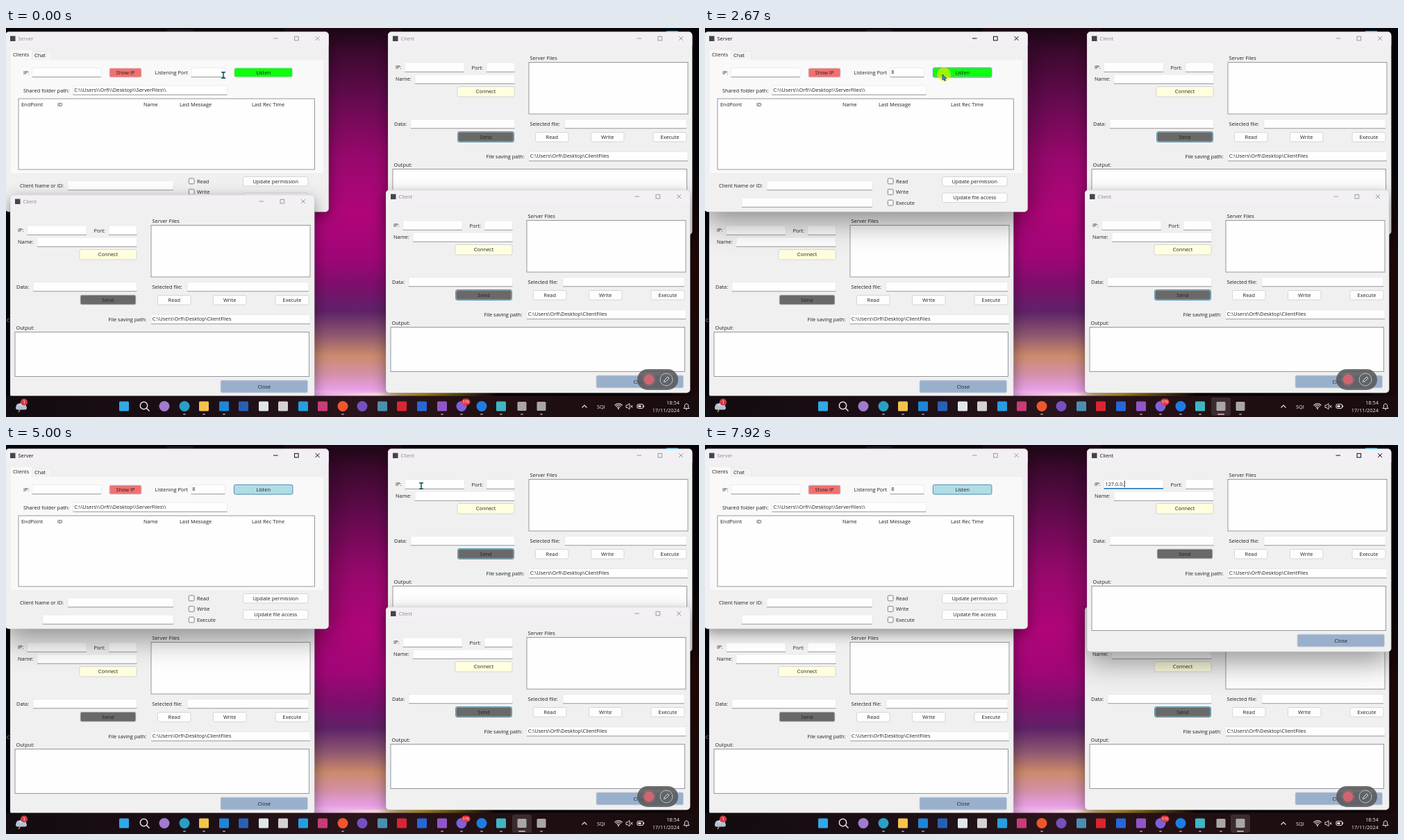
Recreate the animation shown at these times as an HTML page with a canvas. Size 998 px wide and 561 px high, loop 8 s.

```html
<!DOCTYPE html>
<html lang="en">
<head>
<meta charset="utf-8">
<title>Server and clients</title>
<style>
html, body { margin: 0; width: 100%; height: 100%; overflow: hidden; background: #000; }
canvas { display: block; width: 998px; height: 561px; }
</style>
</head>
<body>
<canvas id="stage" width="998" height="561"></canvas>
<script>
const ctx = document.getElementById('stage').getContext('2d');
const LOOP = 8000;
const FONT = '"Open Sans", "Noto Sans", sans-serif';
const INK = '#202020';
const BLUE = '#1a6fc0';

// moments of the story, in ms
const SERVER_CLICK = 340, HIDE_BEAM = 1250, TYPE_PORT = 1500;
const LISTEN_CLICK = 2600, LISTENING = 2840;
const CLIENT_CLICK = 5170;
const ADDRESS = '127.0.0.';
const KEYS = [5750, 5920, 6250, 6750, 7000, 7250, 7420, 7500];
const PATH = [
  [2090, 313, 68], [2560, 342, 67], [3750, 342, 67],
  [4090, 470, 80], [4250, 470, 80], [4950, 598, 59]
];

function rect(x, y, w, h, fill) {
  ctx.fillStyle = fill;
  ctx.fillRect(x, y, w, h);
}

function round(x, y, w, h, r, fill, stroke, line = 1) {
  ctx.beginPath();
  ctx.roundRect(x, y, w, h, r);
  if (fill) { ctx.fillStyle = fill; ctx.fill(); }
  if (stroke) { ctx.strokeStyle = stroke; ctx.lineWidth = line; ctx.stroke(); }
}

function disc(x, y, r, fill, stroke, line = 1) {
  ctx.beginPath();
  ctx.arc(x, y, r, 0, Math.PI * 2);
  if (fill) { ctx.fillStyle = fill; ctx.fill(); }
  if (stroke) { ctx.strokeStyle = stroke; ctx.lineWidth = line; ctx.stroke(); }
}

function lines(color, width, ...runs) {
  ctx.strokeStyle = color;
  ctx.lineWidth = width;
  ctx.beginPath();
  for (const p of runs) {
    ctx.moveTo(p[0], p[1]);
    for (let i = 2; i < p.length; i += 2) ctx.lineTo(p[i], p[i + 1]);
  }
  ctx.stroke();
}

// y is the middle of the capitals
function text(s, x, y, color = INK, align = 'left', size = 7.4) {
  ctx.font = size + 'px ' + FONT;
  ctx.textAlign = align;
  ctx.fillStyle = color;
  ctx.fillText(s, x, y + size * 0.355);
}

function gradient(x0, y0, x1, y1, ...stops) {
  const g = ctx.createLinearGradient(x0, y0, x1, y1);
  for (const [at, color] of stops) g.addColorStop(at, color);
  return g;
}

function field(x, y, w, value = '', focus = false, caret = false) {
  round(x, y, w, 13.5, 1.5, '#fefefe', '#e6e6e8', 0.7);
  if (focus) rect(x, y + 12, w, 1.5, BLUE);
  else rect(x, y + 12.8, w, 0.9, '#929296');
  if (value) text(value, x + 1.8, y + 6.2);
  if (caret) {
    ctx.font = '7.4px ' + FONT;
    rect(x + 2.2 + ctx.measureText(value).width, y + 1.5, 0.9, 9.5, '#111');
  }
}

function button(label, x, y, w, h = 14, fill = '#fdfdfd', focus = false) {
  round(x, y, w, h, 2, fill, '#d2d2d4', 0.9);
  if (focus) round(x - 0.4, y - 0.4, w + 0.8, h + 0.8, 2, null, '#4691b0', 1);
  text(label, x + w / 2, y + h / 2, INK, 'center');
}

function box(x, y, w, h) {
  rect(x, y, w, h, '#fefefe');
  ctx.strokeStyle = '#8b8e96';
  ctx.lineWidth = 0.9;
  ctx.strokeRect(x, y, w, h);
}

function frame(title, w, h, active) {
  ctx.save();
  ctx.shadowColor = 'rgba(0,0,0,.42)';
  ctx.shadowBlur = active ? 42 : 20;
  ctx.shadowOffsetY = active ? 14 : 6;
  round(-1, -0.5, w + 1.3, h + 0.8, 5, '#f0f0f0');
  ctx.restore();
  round(-1, -0.5, w + 1.3, 19.5, [5, 5, 0, 0], '#f3f0f5');
  round(-0.8, -0.3, w + 1, h + 0.5, 5, null, 'rgba(150,150,155,.4)', 0.6);
  rect(6, 5.5, 7.5, 7.5, '#454548');
  text(title, 17.5, 9.3, active ? '#111' : '#8a8a8e');
  const c = active ? '#111' : '#99999d', r = w - 16;
  lines(c, 1, [r - 63.5, 9, r - 57, 9], [r - 3, 6, r + 3, 12], [r + 3, 6, r - 3, 12]);
  ctx.strokeRect(r - 33, 6.3, 5.6, 5.6);
}

function client(x, y, { active = false, sendFocus = false, ip = '', caret = false }) {
  ctx.save();
  ctx.translate(x, y);
  frame('Client', 437, 292, active);
  text('IP:', 10, 50.3);
  field(23.5, 44, 85.5, ip, active, caret);
  text('Port:', 119.5, 51);
  field(141, 44, 40.5);
  text('Name:', 10, 67.5);
  field(38, 61, 143.5);
  button('Connect', 99, 78.5, 82, 14.5, '#ffffe0');
  text('Data:', 8, 132);
  field(32, 125.5, 149.5);
  button('Send', 100, 144, 80, 14, '#696969', sendFocus);
  text('Server Files', 203.5, 37);
  box(202, 43.5, 229, 74.5);
  text('Selected file:', 203.5, 132);
  field(254, 125.5, 175);
  button('Read', 211.5, 144.5, 47.5, 13.5);
  button('Write', 291.5, 144.5, 47.5, 13.5);
  button('Execute', 381, 144.5, 48, 13.5);
  text('File saving path:', 140.5, 179);
  field(202, 172.5, 229, 'C:\\Users\\Orfi\\Desktop\\ClientFiles');
  text('Output:', 7.5, 191);
  box(6, 197.5, 423.5, 64);
  button('Close', 302, 267, 125.5, 18, '#99b0cd');
  ctx.restore();
}

function server(t, active) {
  ctx.save();
  ctx.translate(0, 6);
  frame('Server', 464.5, 259, active);
  ctx.translate(0, -6);
  const portFocus = active && t < LISTEN_CLICK;
  const typed = t >= TYPE_PORT;
  const since = t - (typed ? TYPE_PORT : SERVER_CLICK);
  round(37, 34, 30, 13, 1, '#f3f3f3', '#e4e4e6', 0.7);
  rect(7, 46, 450, 163, '#f9f9fa');
  rect(7, 32, 30, 15, '#f9f9fa');
  text('Clients', 10, 38.7);
  text('Chat', 41, 39.7);
  text('IP:', 25, 64.3);
  field(37.5, 57.5, 99.5);
  button('Show IP', 149, 58, 46, 13, '#f07070');
  text('Listening Port', 214.5, 64.3);
  field(266.5, 57.5, 49, typed ? '8' : '', portFocus, portFocus && since % 1060 < 530);
  button('Listen', 328.8, 57.7, 83.7, 13, t < LISTENING ? '#0cff0c' : '#b0dce6', t >= LISTEN_CLICK);
  text('Shared folder path:', 25, 90);
  field(96.5, 83, 222, 'C:\\\\Users\\\\Orfi\\\\Desktop\\\\ServerFiles\\\\');
  box(18, 102, 426.5, 102);
  text('EndPoint', 22, 110);
  text('ID', 74, 110);
  text('Name', 198, 110);
  text('Last Message', 250, 110);
  text('Last Rec Time', 354, 110);
  text('Client Name or ID:', 20, 227.5);
  field(89, 220.5, 152);
  field(53, 245, 188);
  ['Read', 'Write', 'Execute'].forEach((label, i) => {
    const y = 221 + i * 15.6;
    round(263.3, y - 4, 7.8, 7.8, 1.5, '#f8f8f8', '#737376', 0.9);
    text(label, 275, y + 0.2);
  });
  button('Update permission', 341.5, 214.5, 93.5, 13.5);
  button('Update file access', 341.5, 238, 93.5, 13.5);
  ctx.restore();
}

function wallpaper() {
  rect(0, 0, 998, 561, '#050307');
  rect(400, 0, 170, 531, gradient(0, 0, 0, 531,
    [0, '#1c0614'], [0.07, '#3e0930'], [0.2, '#670a50'], [0.35, '#98086d'],
    [0.5, '#b00579'], [0.62, '#a00577'], [0.7, '#7c0f6c'], [0.77, '#5f2268'],
    [0.83, '#8a5470'], [0.89, '#cc8a6c'], [0.94, '#d490aa'], [0.98, '#e79fe4'], [1, '#f4c4f0']));
  rect(960, 200, 38, 331, gradient(0, 200, 0, 531,
    [0, '#050307'], [0.4, '#200907'], [1, '#1c0908']));
  rect(444, 526, 260, 5, gradient(444, 0, 704, 0,
    [0, '#e8a4e4'], [0.35, '#f6d8dc'], [0.6, '#cfa820'], [1, '#140808']));
  rect(232, 2.5, 38, 2, '#26262a');
  rect(951, 4, 17, 3, '#2aa7d8');
  text('C', 1, 422, '#b8b8b8', 'left', 7);
}

const ICONS = [
  [170, '#31a8e8'], [228, '#a07bd0', 1], [257, '#2a9fc4', 1], [285, '#f3c44c'],
  [314, '#1f86d6'], [342, '#2860b4'], [371, '#dfe6ec'], [399, '#d5d2d0'],
  [428, '#259ee0'], [456, '#c83c78'], [485, '#f0562c', 1], [513, '#7550c0', 1],
  [542, '#4a8fb0'], [570, '#d92632'], [599, '#2767d8'], [628, '#9056c8'],
  [656, '#7b62dc', 1], [685, '#1f7ce6', 1], [713, '#3fb6c4'], [743, '#a9a6a8'], [771, '#a9a6a8']
];
const RUNNING = [257, 285, 314, 485, 628, 656, 685, 713, 743, 771];

function taskbar(active) {
  rect(0, 530.5, 998, 31, gradient(0, 0, 998, 0,
    [0, '#120b0f'], [0.3, '#1d0f16'], [0.5, '#2a141b'], [0.7, '#231013'], [1, '#180c0e']));
  if (active) {
    round(active - 14, 533, 28, 26, 3, 'rgba(255,255,255,.12)');
  }
  for (const [x, color, circle] of ICONS) {
    if (circle) disc(x, 545.5, 7.5, color);
    else {
      const s = x > 730 ? 13 : 14;
      round(x - s / 2, 545.5 - s / 2, s, s, 1.5, color);
    }
  }
  for (const x of RUNNING) {
    const w = x === active ? 10 : 4;
    round(x - w / 2, 556.2, w, 1.7, 0.8, x === active ? '#d9a2c4' : '#9b9196');
  }
  disc(198.5, 544.5, 5.2, null, '#e6e2e4', 1.5);
  lines('#e6e2e4', 1.6, [202.3, 548.3, 206.5, 552.5]);
  disc(19, 546, 4.5, '#b9c4d6');
  disc(24, 544.5, 5, '#ccd5e2');
  round(14, 545, 16, 5.5, 2.7, '#b4c0d4');
  lines('#e8b23c', 1.3, [20, 551, 18, 554]);
  disc(26, 539.5, 5, '#d23c46');
  text('1', 26, 539.5, '#fff', 'center', 6.5);
  round(656, 534.5, 12.5, 9.5, 4.7, '#e0353f');
  text('376', 662.2, 539.2, '#fff', 'center', 5.5);
  tray();
}

function tray() {
  const c = '#eeeaec';
  lines(c, 1.1, [829.5, 547.5, 833, 544, 836.5, 547.5]);
  text('SQI', 851, 546, c);
  ctx.strokeStyle = c;
  ctx.lineWidth = 1.1;
  for (const r of [2.8, 5.2, 7.6]) {
    ctx.beginPath();
    ctx.arc(882, 549.5, r, -Math.PI * 0.76, -Math.PI * 0.24);
    ctx.stroke();
  }
  disc(882, 549, 1, c);
  lines(c, 0.9, [893, 544, 895, 544, 898, 541.5, 898, 550, 895, 547.5, 893, 547.5, 893, 544],
    [899.5, 544, 902.5, 547.5], [902.5, 544, 899.5, 547.5]);
  round(909, 542.5, 8.5, 6, 1.5, null, c, 1);
  rect(910.5, 544, 4, 3, c);
  rect(918.2, 544.3, 1, 2.4, c);
  text('18:54', 970, 540, c, 'right');
  text('17/11/2024', 970, 551, c, 'right');
  lines(c, 1, [976, 548.5, 977.5, 546.5, 977.5, 543.5, 980, 541.5, 982.5, 543.5, 982.5, 546.5, 984, 548.5, 976, 548.5],
    [979, 550.2, 981, 550.2]);
}

function recorder() {
  round(909, 492, 59, 30, 15, 'rgba(88,88,91,.87)');
  disc(926, 507, 9, null, '#94757b', 0.8);
  disc(926, 507, 7.5, '#d0656f');
  disc(951, 507, 9, null, '#c4c4c6', 0.9);
  lines('#e0e0e2', 1, [947.5, 510.5, 948.3, 507.7, 953, 503, 955, 505, 950.3, 509.7, 947.5, 510.5]);
}

function pointerAt(t) {
  let [, x, y] = PATH[0];
  for (let i = 1; i < PATH.length; i++) {
    const [t0, x0, y0] = PATH[i - 1], [t1, x1, y1] = PATH[i];
    if (t < t0) break;
    const u = Math.min(1, (t - t0) / (t1 - t0)), e = u * u * (3 - 2 * u);
    x = x0 + (x1 - x0) * e;
    y = y0 + (y1 - y0) * e;
  }
  return [x, y];
}

function pointer(t) {
  if ((t >= HIDE_BEAM && t < PATH[0][0]) || t >= KEYS[0]) return;
  const [x, y] = pointerAt(t);
  for (const click of [SERVER_CLICK, LISTEN_CLICK, CLIENT_CLICK]) {
    const age = t - click + 80;
    if (age < 0 || age > 400) continue;
    const fade = Math.min(1, (400 - age) / 200);
    disc(x + 2, y, 10, `rgba(255,238,0,${0.6 * fade})`);
  }
  const overField = y > 50 && y < 72 && ((x > 266 && x < 316) || (x > 574 && x < 660 && y < 64));
  if (overField) {
    lines('#124d5c', 1.5, [x, y - 4, x, y + 4], [x - 3, y - 4.3, x + 3, y - 4.3], [x - 3, y + 4.3, x + 3, y + 4.3]);
    return;
  }
  ctx.beginPath();
  [[0, 0], [0, 8], [1.8, 6.4], [3.2, 9.3], [4.6, 8.6], [3.3, 5.8], [5.7, 5.6]]
    .forEach(([dx, dy]) => ctx.lineTo(x + dx, y + dy));
  ctx.closePath();
  ctx.fillStyle = '#20a4d8';
  ctx.fill();
  ctx.strokeStyle = '#0c3a58';
  ctx.lineWidth = 0.8;
  ctx.stroke();
}

function draw(t) {
  const clientActive = t >= CLIENT_CLICK;
  const serverActive = t >= SERVER_CLICK && !clientActive;
  const count = KEYS.filter(k => t >= k).length;
  const lastKey = count ? KEYS[count - 1] : CLIENT_CLICK;
  const first = () => client(551, 6, {
    active: clientActive,
    sendFocus: !clientActive,
    ip: ADDRESS.slice(0, count),
    caret: clientActive && (t - lastKey) % 1060 < 530
  });

  wallpaper();
  if (t < SERVER_CLICK) server(t, false);
  client(7, 241, {});
  if (!clientActive) first();
  client(548, 234, { sendFocus: true });
  if (t >= SERVER_CLICK) server(t, serverActive);
  if (clientActive) first();
  taskbar(clientActive ? 771 : serverActive ? 743 : 0);
  recorder();
  pointer(t);
}

const start = performance.now();
function tick() {
  draw((performance.now() - start) % LOOP);
  requestAnimationFrame(tick);
}
tick();
</script>
</body>
</html>
```
